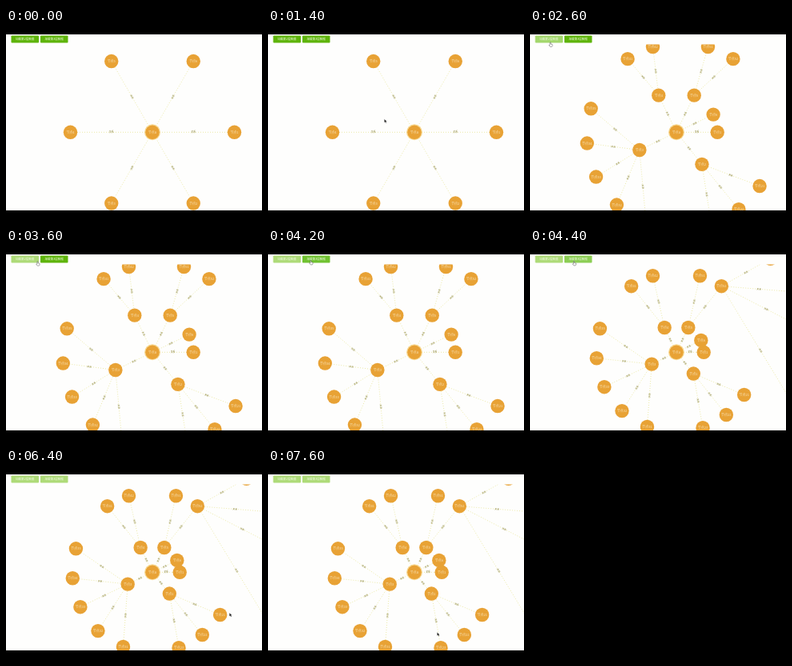
Recreate the animation shown at these times as an HTML page. Size 320x240 px, loop 7800 ms.

```html
<!DOCTYPE html>
<html lang="zh">
<head>
<meta charset="utf-8">
<title>Graph layout</title>
<style>
html, body { margin: 0; width: 100%; height: 100%; overflow: hidden; background: #000; }
svg { display: block; width: 320px; height: 240px; }
text { font-family: "Noto Sans CJK SC", "Noto Sans CJK", "Noto Sans", sans-serif; text-anchor: middle; }
.node { fill: #e8a235; }
.halo { fill: #f7d993; }
.name { fill: #f8e4bb; font-size: 4px; }
.link { stroke: #e4e184; stroke-width: .7; stroke-dasharray: 1 2; }
.tag { fill: #857f30; font-size: 2.9px; }
.label { fill: #f6fdec; font-size: 3.6px; }
</style>
</head>
<body>
<svg id="stage" viewBox="0 0 320 240">
  <defs><clipPath id="view"><rect y="20.5" width="320" height="207.5"/></clipPath></defs>
  <rect width="320" height="240"/>
  <rect y="8" width="320" height="220" fill="#fefefd"/>
  <g id="graphs" clip-path="url(#view)"></g>
  <g id="buttons"></g>
  <path id="arrow" d="M0 0V4L1 3.2L1.7 4.7L2.4 4.4L1.7 2.9H3Z" fill="#222"/>
  <path id="hand" d="M0 0L.9 0V2L3 2.5V4.4L2.4 5.4H.2L-1.3 3.4L0 3.2Z" fill="#fff" stroke="#555" stroke-width=".5"/>
</svg>
<script>
const LOOP = 7800, STEP = 200, FADE = 400;
const CENTER = [183, 130.3];
const GREEN = [94, 180, 10], HOVER = [118, 198, 60], DISABLED = [174, 219, 120];
const KIDS = [0, 3, 5, 2, 2, 0];
const $ = id => document.getElementById(id);
const clamp = v => Math.min(1, Math.max(0, v));
const mix = (a, b, k) => a.map((v, i) => v + (b[i] - v) * k);

function add(parent, tag, attrs, text) {
  const el = document.createElementNS('http://www.w3.org/2000/svg', tag);
  for (const k in attrs) el.setAttribute(k, attrs[k]);
  if (text) el.textContent = text;
  return parent.appendChild(el);
}

function polar(r, deg, shift = 0) {
  const a = deg * Math.PI / 180;
  return [CENTER[0] + shift + r * Math.cos(a), CENTER[1] + shift + r * Math.sin(a)];
}

// Radial tree: every branch gets an arc in proportion to its leaves.
function build({ inner, outer, shift = 0, fan }) {
  const g = add($('graphs'), 'g', {});
  const links = add(g, 'g', {}), nodes = add(g, 'g', {});

  function node([x, y], name, parent) {
    add(nodes, 'circle', { class: 'node', cx: x, cy: y, r: 8.7 });
    add(nodes, 'text', { class: 'name', x, y: y + 1.5 }, '节点' + name);
    if (!parent) return;
    const [px, py] = parent;
    const angle = Math.atan((y - py) / (x - px)) * 180 / Math.PI;
    add(links, 'line', { class: 'link', x1: px, y1: py, x2: x, y2: y });
    add(links, 'text', {
      class: 'tag', y: 1.1,
      transform: `translate(${(x + px) / 2} ${(y + py) / 2}) rotate(${angle})`
    }, '关系');
  }

  add(nodes, 'circle', { class: 'halo', cx: CENTER[0], cy: CENTER[1], r: 10 });
  node(CENTER, 'a');
  const kids = outer ? KIDS : KIDS.map(() => 0);
  const slot = 360 / kids.reduce((sum, n) => sum + Math.max(1, n), 0);
  let from = -slot / 2, last;
  kids.forEach((n, i) => {
    const arc = slot * Math.max(1, n), branch = polar(inner, from + arc / 2);
    node(branch, i + 1, CENTER);
    for (let j = 1; j <= n; j++) {
      last = polar(outer, from + arc * j / (n + 1), shift);
      node(last, `${i + 1}${j}`, branch);
    }
    from += arc;
  });
  if (fan) [0, 1, 2, 4].forEach(i => node(polar(166, 18.4 * i - 47.3, 5), i, last));
  return g;
}

const graphs = [
  { inner: 102.5 },
  { inner: 51.2, outer: 117, shift: 5 },
  { inner: 34.2, outer: 100, fan: true }
].map(build);

const buttons = [{ over: 1900, click: 2280 }, { over: 3900, click: 4240 }];
buttons.forEach((b, i) => {
  const x = 6.5 + 36.5 * i;
  b.el = add($('buttons'), 'rect', { x, y: 9.5, width: 34.5, height: 9, rx: .8 });
  add($('buttons'), 'text', { class: 'label', x: x + 17.2, y: 15.3 }, `加载第${i + 2}层数据`);
});

// Pointer moves: start, end, x, y
const moves = [
  [0, 400, 267, 212], [800, 2000, 24, 16], [2200, 2600, 25, 18],
  [3200, 4000, 53, 15.5], [4200, 4400, 54.5, 16.5],
  [4800, 5600, 290, 176], [6200, 7000, 222, 210], [7200, 7600, 211.5, 205.5]
];
function pointer(t) {
  let pos = [234, 130];
  for (const [t0, t1, x, y] of moves) {
    const k = clamp((t - t0) / (t1 - t0));
    pos = mix(pos, [x, y], k * k * (3 - 2 * k));
  }
  return pos;
}

function draw(now) {
  const t = Math.floor(now % LOOP / STEP) * STEP;
  const shown = t < 2600 ? 0 : t < 4400 ? 1 : 2;
  graphs.forEach((g, i) => g.setAttribute('visibility', i === shown ? 'visible' : 'hidden'));
  for (const { el, over, click } of buttons) {
    const lit = mix(GREEN, HOVER, clamp((t - over) / FADE));
    el.setAttribute('fill', `rgb(${mix(lit, DISABLED, clamp((t - click) / FADE))})`);
  }
  const [x, y] = pointer(t);
  const over = y < 20 && x < 78;
  for (const id of ['arrow', 'hand']) {
    $(id).setAttribute('transform', `translate(${x} ${y})`);
    $(id).setAttribute('visibility', t > 0 && (id === 'hand') === over ? 'visible' : 'hidden');
  }
}

const start = performance.now();
(function tick() {
  draw(performance.now() - start);
  requestAnimationFrame(tick);
})();
</script>
</body>
</html>
```
